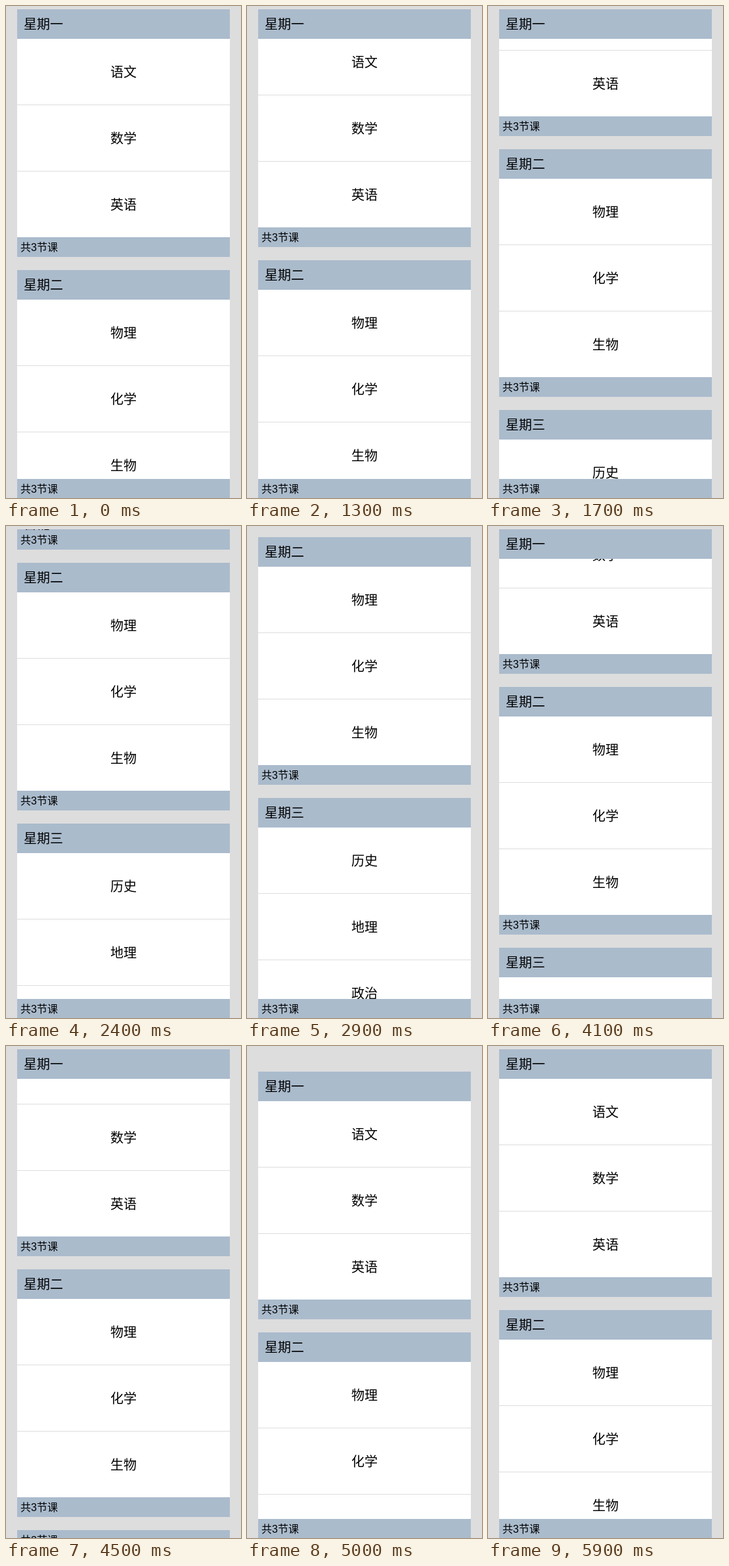
These frames come from a looping animation (358 by 749 pixels, 6.4 s). An HTML page with a canvas:

```html
<!DOCTYPE html>
<html lang="zh-CN">
<head>
<meta charset="utf-8">
<title>课程表</title>
<style>
  html, body { margin: 0; width: 100%; height: 100%; overflow: hidden; background: #ddd; }
  canvas { display: block; }
</style>
</head>
<body>
<canvas id="stage" width="358" height="749"></canvas>
<script>
const ctx = document.getElementById('stage').getContext('2d');
const LOOP = 6400, STEP = 100;
const WIDTH = 358, HEIGHT = 749;
const LEFT = 17, LIST_WIDTH = 324, TOP = 5, BOTTOM = 750;
const HEADER = 45, ROW = 100, LINE = 1, FOOTER = 30, GAP = 20;
const FONTS = '"Liberation Sans", Arial, "Noto Sans CJK SC", "Noto Sans CJK", sans-serif';

const days = [
  ['星期一', '语文', '数学', '英语'],
  ['星期二', '物理', '化学', '生物'],
  ['星期三', '历史', '地理', '政治']
];

// [time in ms, scroll offset in px]
const path = [
  [0, 0], [1200, 0], [1700, 184], [2400, 346], [3000, 387], [3100, 387],
  [3400, 344], [4100, 157], [4500, 62], [4800, 0], [5000, -34], [5100, -42],
  [5200, -42], [5300, -31], [5500, -14], [5700, -3], [5900, 0], [LOOP, 0]
];

const slope = i => (path[i + 1][1] - path[i][1]) / (path[i + 1][0] - path[i][0]);

// Harmonic mean of neighbouring slopes keeps the curve monotone between points.
function tangent(i) {
  if (i === 0 || i === path.length - 1) return 0;
  const a = slope(i - 1), b = slope(i);
  return a * b > 0 ? 2 * a * b / (a + b) : 0;
}

function scrollAt(time) {
  let i = 0;
  while (time >= path[i + 1][0]) i++;
  const [t0, y0] = path[i], [t1, y1] = path[i + 1];
  const span = t1 - t0, u = (time - t0) / span, v = 1 - u;
  return Math.round(
    y0 * (1 + 2 * u) * v * v + y1 * u * u * (3 - 2 * u) +
    span * u * v * (tangent(i) * v - tangent(i + 1) * u));
}

function bar(color, y, height) {
  ctx.fillStyle = color;
  ctx.fillRect(LEFT, y, LIST_WIDTH, height);
}

function label(text, x, baseline, size, align = 'left') {
  ctx.fillStyle = '#000';
  ctx.font = `${size}px ${FONTS}`;
  ctx.textAlign = align;
  ctx.fillText(text, x, baseline);
}

function drawDay([name, ...lessons], top) {
  const body = lessons.length * (ROW + LINE) - LINE;
  const height = HEADER + body + FOOTER;
  const headerY = Math.min(Math.max(top, TOP), top + height - HEADER);
  const footerY = Math.max(top, Math.min(top + height, BOTTOM) - FOOTER);

  bar('#fff', top, height);
  lessons.forEach((lesson, i) => {
    const y = top + HEADER + i * (ROW + LINE);
    if (i) bar('#ddd', y - LINE, LINE);
    label(lesson, WIDTH / 2, y + 58, 20, 'center');
  });
  bar('#abc', headerY, HEADER);
  label(name, LEFT + 10, headerY + 30, 20);
  bar('#abc', footerY, FOOTER);
  label(`共${lessons.length}节课`, LEFT + 5, footerY + 21, 16);
  return top + height + GAP;
}

function draw(time) {
  ctx.fillStyle = '#ddd';
  ctx.fillRect(0, 0, WIDTH, HEIGHT);
  ctx.save();
  ctx.beginPath();
  ctx.rect(0, TOP, WIDTH, HEIGHT - TOP);
  ctx.clip();
  let top = TOP - scrollAt(time);
  for (const day of days) top = drawDay(day, top);
  ctx.restore();
}

const start = performance.now();
function tick() {
  const time = (performance.now() - start) % LOOP;
  draw(Math.floor(time / STEP) * STEP);
  requestAnimationFrame(tick);
}
tick();
</script>
</body>
</html>
```
